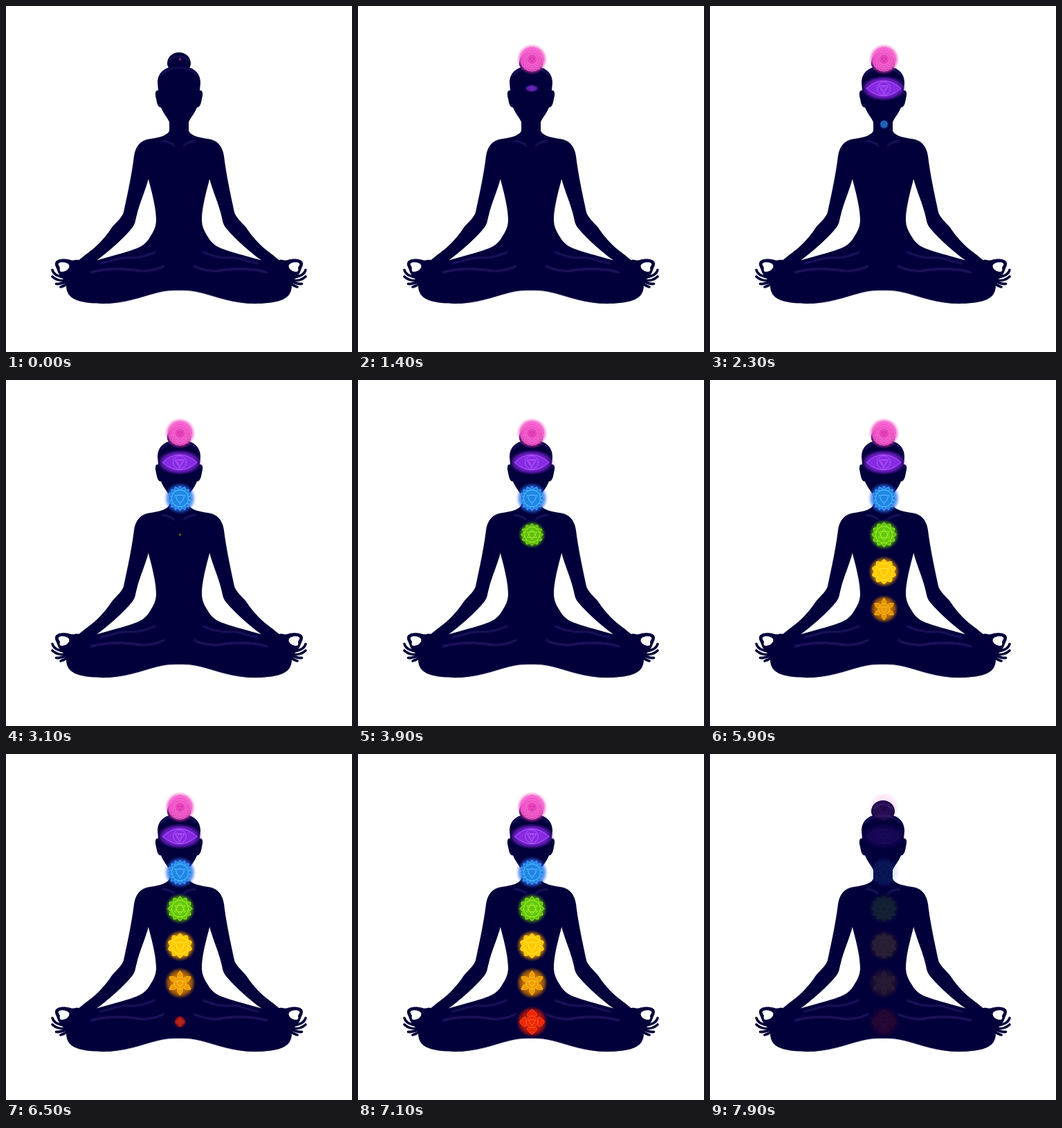
Animation of 500x500 px, one loop 8000 ms. Source, as an HTML page:

```html
<!DOCTYPE html>
<html lang="en">
<head>
<meta charset="utf-8">
<title>Chakras</title>
<style>
html, body { margin: 0; width: 100%; height: 100%; overflow: hidden; background: #fff; }
svg { display: block; width: 100vw; height: 100vh; }
</style>
</head>
<body>
<svg viewBox="0 0 500 500">
  <defs>
    <filter id="soft" x="-30%" y="-80%" width="160%" height="260%"><feGaussianBlur stdDeviation="0.9"/></filter>
    <g id="half">
      <path fill="#02003b" d="M250.5 67 C240 67 233 74 233 83 C233 86 234 88 235 89
        C225 92 219 100 219 111 L220 122 C215.500 121 215 127 217 134 C218 141 220 147 224 146.500
        C227 155 234 162 236 168 L236 180 C234 187 222 190 208 192 C194 194 187 203 185 217
        C182 242 176 270 170 298 C168 305 160 312 153 320 C146 331 134 345 122 354
        C114 360 109 364 103 369 L88 390 L87 404 C87 413 91 421 102 425 C116 430 134 430.500 150 430
        C180 428 205 417 225 413 C235 411 243 411 250.500 411 Z"/>
      <path fill="#fff" d="M205.800 250 C209 263 217 290 217 309 C217 319 213 326 208 334
        C203 343 196 348 184 352 C170 357 150 362 131 367.500 C148 355 167 339 182 321
        C187 315 187 309 189 302 C193 285 201 268 205.800 250 Z"/>
      <path fill="#02003b" fill-rule="evenodd" d="M108 368 C101 365 98 369 93 367 C86 365 80 365 75 367
        C70 369 70 374 73 379 C75 385 77 390 84 396 L90 408 L106 396 Z
        M76.500 371.500 C80 369.500 88 370 91 374 C93 378 88 383.500 82 384 C78 384.500 77 382 78 379 C78 376 74 374 76.500 371.500 Z"/>
      <g fill="none" stroke="#02003b" stroke-width="3.600" stroke-linecap="round">
        <path d="M67 381.500 C69 388 74 390 83 392"/>
        <path d="M67 391 C72 396 78 397 88 397"/>
        <path d="M72.500 401.500 C77 402 81 401 89 398"/>
        <path d="M79 406 C83 405 85 404 89 401"/>
      </g>
      <path fill="none" stroke="#b9b3d0" stroke-width=".6" d="M165 428.500 C188 425 207 417 225 413.300 C235 411.300 243 411.300 250 411.300"/>
      <g fill="none" stroke="#2b1c6c" stroke-linecap="round" filter="url(#soft)">
        <path stroke-width="2" d="M226 195 C234 196 240 198 243 202"/>
        <path stroke-width="2.400" d="M123 385 C140 380 160 379 182 381 C200 385 214 383 228 376"/>
        <path stroke-width="2" d="M136 372 C155 369 163 362 180 364 C195 364 204 360 215 356"/>
        <path stroke-width="1.600" d="M224 100 C231 92 240 89 250 89"/>
        <path stroke-width="1.600" d="M237 79 C240 75 245 73 250 73"/>
      </g>
    </g>
  </defs>
  <rect width="500" height="500" fill="#fff"/>
  <use href="#half"/>
  <use href="#half" transform="matrix(-1 0 0 1 500 0)"/>
  <g id="marks"></g>
</svg>
<script>
const LOOP = 8000, STEP = 100, GROW = 1000;
const layer = document.getElementById('marks');

// rx, ry: glow radii; lit: line colour; core: disc colour
const chakras = [
  { x: 251.5, y: 77, rx: 22.5, ry: 22.5, glow: '#f03cc0', core: '#ee4fc4', lit: '#ff8be0', petals: 20, start: -100 },
  { x: 251, y: 119, rx: 33, ry: 18.5, glow: '#8424e0', core: '#8a2ce6', lit: '#b964ff', petals: 0, start: 1100 },
  { x: 251.5, y: 171, rx: 23.5, ry: 23.5, glow: '#2868e8', core: '#1f86e4', lit: '#58b8ff', petals: 16, start: 2000 },
  { x: 251.5, y: 223.5, rx: 22.5, ry: 22.5, glow: '#4fa80a', core: '#62c60c', lit: '#a4f02c', petals: 12, start: 3000 },
  { x: 251.5, y: 277, rx: 23, ry: 23, glow: '#d89000', core: '#ffc800', lit: '#ffe838', petals: 10, start: 4000 },
  { x: 251.5, y: 331, rx: 23, ry: 23, glow: '#c87400', core: '#f09a00', lit: '#ffc428', petals: 6, start: 5000 },
  { x: 251.5, y: 387, rx: 23, ry: 23, glow: '#c81808', core: '#ee2606', lit: '#ff5a20', petals: 4, start: 6100 }
];

const tag = (name, attrs) =>
  `<${name} ${Object.entries(attrs).map(([k, v]) => `${k}="${v}"`).join(' ')}/>`;
const ring = (r, stroke, w = 0.8) => tag('circle', { r, fill: 'none', stroke, 'stroke-width': w });
const triangle = (r, stroke, turn = 0) => tag('path', {
  d: `M0 ${r}L${-r * .87} ${-r / 2}H${r * .87}Z`, fill: 'none', stroke,
  'stroke-width': 0.9, transform: `rotate(${turn})`
});

function petalRing(n, inner, outer, fill, stroke) {
  const half = inner * Math.tan(Math.PI / n) * (n < 7 ? .8 : 1.05);
  const mid = (inner + outer) / 2;
  const d = `M${-half} ${-inner}Q${-half * 1.2} ${-mid} 0 ${-outer}Q${half * 1.2} ${-mid} ${half} ${-inner}Z`;
  let out = '';
  for (let i = 0; i < n; i++)
    out += tag('path', { d, fill, stroke, 'stroke-width': 0.7, transform: `rotate(${i * 360 / n})` });
  return out;
}

function crown(c) {
  let out = tag('circle', { r: 17.5, fill: c.core, opacity: .85 });
  for (const r of [8, 12, 16])
    out += petalRing(c.petals, r - 1.5, r + 1.5, 'none', c.lit);
  return `<g opacity=".7">${out}</g>` + ring(6, '#d836ac') + triangle(4, '#c42a9c');
}

function eye(c) {
  return tag('path', { d: 'M-25 0Q-12 -11 0 -11Q12 -11 25 0Q12 11 0 11Q-12 11 -25 0Z',
      fill: c.core, stroke: c.lit, 'stroke-width': 1, opacity: .85 }) +
    ring(9.5, c.lit) + triangle(7.5, c.lit) + ring(3, c.lit, .6);
}

function wheel(c) {
  const inner = c.petals < 7 ? 8.5 : 12;
  return petalRing(c.petals, inner, 18, c.core, c.lit) +
    tag('circle', { r: inner, fill: c.core, stroke: c.lit, 'stroke-width': 1 }) +
    triangle(inner * .75, c.lit) +
    (c.petals === 12 ? triangle(9, c.lit, 180) : '') +
    ring(inner * .45, c.lit, .7);
}

chakras.forEach((c, i) => {
  const stops = [[0, 1], [.6, .9], [.78, .62], [.9, .22], [1, 0]]
    .map(([offset, o]) => tag('stop', { offset, 'stop-color': c.glow, 'stop-opacity': o })).join('');
  const art = i === 0 ? crown(c) : i === 1 ? eye(c) : wheel(c);
  layer.insertAdjacentHTML('beforeend',
    `<g><radialGradient id="glow${i}">${stops}</radialGradient>` +
    tag('ellipse', { rx: c.rx, ry: c.ry, fill: `url(#glow${i})` }) + art + '</g>');
  c.node = layer.lastElementChild;
});

function draw(ms) {
  const t = Math.floor((ms % LOOP) / STEP) * STEP;
  layer.setAttribute('opacity', t < 7800 ? 1 : t < 7900 ? .55 : .15);
  for (const c of chakras) {
    const p = Math.max(0, Math.min(1, (t - c.start) / GROW));
    c.node.setAttribute('visibility', p > 0 ? 'visible' : 'hidden');
    c.node.setAttribute('opacity', Math.pow(p, .3));
    c.node.setAttribute('transform', `translate(${c.x} ${c.y}) scale(${p || .01})`);
  }
}

const begin = performance.now();
function tick() {
  draw(performance.now() - begin);
  requestAnimationFrame(tick);
}
tick();
</script>
</body>
</html>
```
